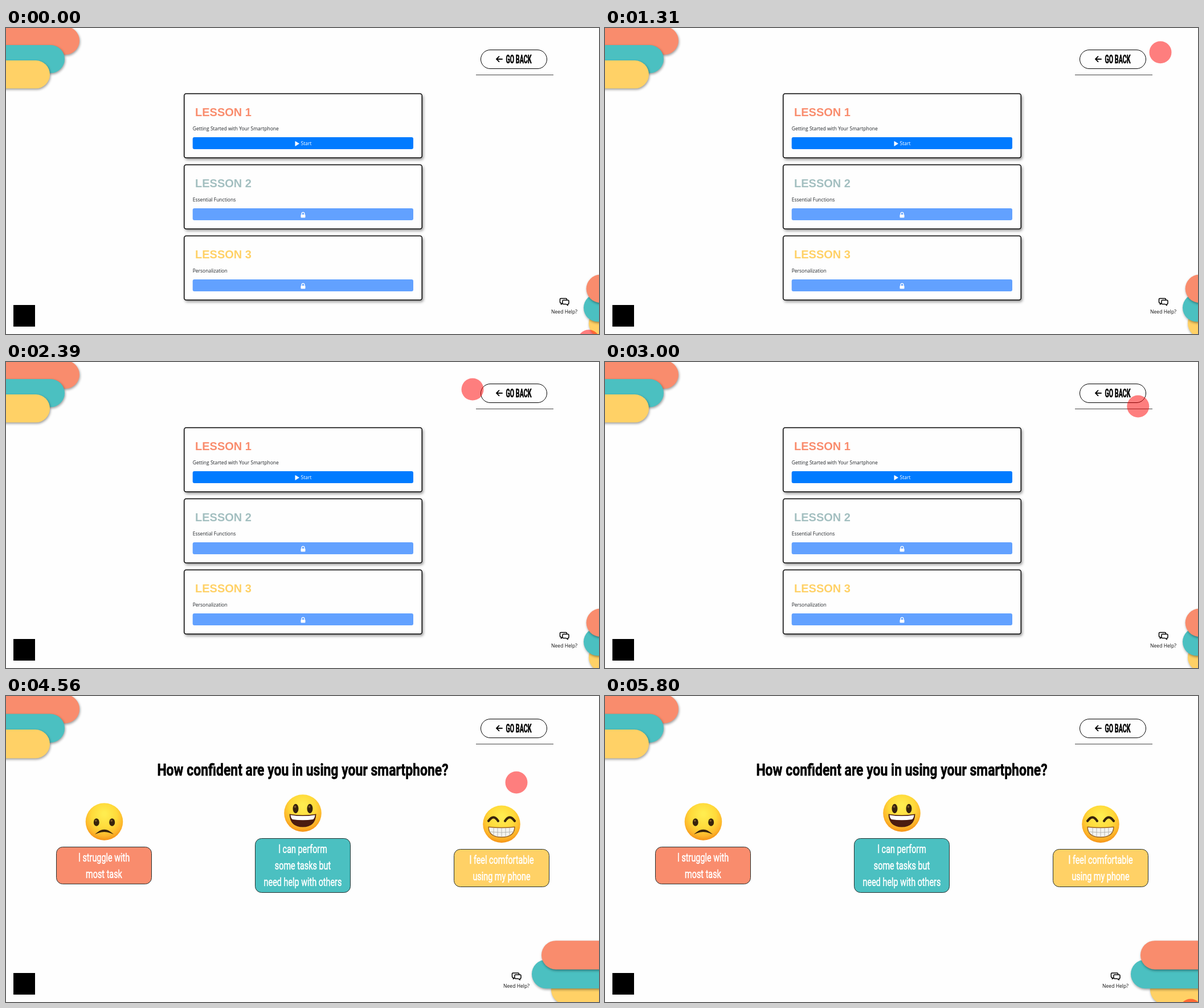
An HTML page with a canvas that plays this animation: 1041 px wide and 538 px high, repeating every 6.07 s.

```html
<!DOCTYPE html>
<html lang="en">
<head>
<meta charset="utf-8">
<title>Lessons</title>
<style>
html, body { margin: 0; width: 100%; height: 100%; overflow: hidden; background: #fefefe; }
canvas { display: block; width: 100vw; height: 100vh; }
</style>
</head>
<body>
<canvas id="stage" width="1041" height="538"></canvas>
<script>
const ctx = document.getElementById('stage').getContext('2d');
const LOOP = 6070, SWITCH = 3760;
const CORAL = '#f98c6d', TEAL = '#4bc0c1', YELLOW = '#ffd166', PAPER = '#fefefe';
const BODY = '"Open Sans", "Noto Sans", sans-serif';
const HEAD = '"Liberation Sans", Arial, sans-serif';
const DISPLAY = 'Roboto, sans-serif';

// Pointer path: time, x, y
const path = [
  [0, 1023, 550], [70, 1023, 550], [350, 968, 350], [640, 905, 166], [910, 916, 112], [1100, 916, 112],
  [1310, 975, 43], [1660, 930, 16], [2000, 852, 20], [2390, 819, 48],
  [2660, 850, 86], [2930, 925, 84], [3130, 938, 64], [3350, 886, 54],
  [4230, 886, 54], [4560, 896, 152], [4860, 896, 152],
  [5460, 985, 410], [5800, 1028, 552], [LOOP, 1028, 552]
];

const clamp = v => Math.max(0, Math.min(1, v));
const fade = (t, start, time) => clamp((t - start) / time);

// Slope at a key; zero where the pointer rests
function slope(i, axis) {
  const a = path[i - 1], b = path[i], c = path[i + 1];
  if (!a || !c) return 0;
  const rests = (p, q) => p[1] === q[1] && p[2] === q[2];
  return rests(a, b) || rests(b, c) ? 0 : (c[axis] - a[axis]) / (c[0] - a[0]);
}

function pointerAt(t) {
  let i = 0;
  while (i < path.length - 2 && t >= path[i + 1][0]) i++;
  const a = path[i], b = path[i + 1], d = b[0] - a[0], u = (t - a[0]) / d;
  const u2 = u * u, u3 = u2 * u;
  return [1, 2].map(k =>
    (2 * u3 - 3 * u2 + 1) * a[k] + (u3 - 2 * u2 + u) * d * slope(i, k) +
    (3 * u2 - 2 * u3) * b[k] + (u3 - u2) * d * slope(i + 1, k));
}

function box(x, y, w, h, r, fill, stroke, line = 1) {
  ctx.beginPath();
  ctx.roundRect(x, y, w, h, r);
  if (fill) { ctx.fillStyle = fill; ctx.fill(); }
  if (stroke) { ctx.strokeStyle = stroke; ctx.lineWidth = line; ctx.stroke(); }
}

function shadowed(dx, dy, blur, alpha, draw) {
  ctx.save();
  ctx.shadowColor = `rgba(0,0,0,${alpha})`;
  ctx.shadowOffsetX = dx;
  ctx.shadowOffsetY = dy;
  ctx.shadowBlur = blur;
  draw();
  ctx.restore();
}

function oval(x, y, rx, ry, fill) {
  ctx.beginPath();
  ctx.ellipse(x, y, rx, ry, 0, 0, 7);
  ctx.fillStyle = fill;
  ctx.fill();
}

function shape(d, fill, stroke, line) {
  const p = new Path2D(d);
  if (fill) { ctx.fillStyle = fill; ctx.fill(p); }
  if (stroke) { ctx.strokeStyle = stroke; ctx.lineWidth = line; ctx.stroke(p); }
}

function at(x, y, draw) {
  ctx.save();
  ctx.translate(x, y);
  draw();
  ctx.restore();
}

function text(str, x, y, font, fill, align = 'left', narrow = 1) {
  at(x, y, () => {
    ctx.scale(narrow, 1);
    ctx.font = font;
    ctx.textAlign = align;
    ctx.fillStyle = ctx.strokeStyle = fill;
    ctx.fillText(str, 0, 0);
    // Narrowing thins the stems, so thicken them again
    if (narrow < 1) {
      ctx.lineWidth = .6;
      ctx.lineJoin = 'round';
      ctx.strokeText(str, 0, 0);
    }
  });
}

function pill(x, y, w, h, fill) {
  shadowed(1, 2, 4, .4, () => box(x, y, w, h, h / 2, fill));
}

function leftPills(y1, y2, y3, h) {
  pill(-60, y1, 189, h, CORAL);
  pill(-60, y2, 163, h, TEAL);
  pill(-60, y3, 137, h, YELLOW);
}

function rightPills(coral, teal, yellow, y, h) {
  pill(yellow, y + 61, 200, h, YELLOW);
  pill(teal, y + 33.5, 200, h, TEAL);
  pill(coral, y, 200, h, CORAL);
}

function mix(a, b, k) {
  return `rgb(${a.map((v, i) => Math.round(v + (b[i] - v) * k))})`;
}

function backButton(y, hover) {
  const fill = mix([254, 254, 254], [38, 104, 208], hover);
  const edge = mix([0, 0, 0], [36, 84, 165], hover);
  box(833.5, y + .5, 116, 33, 16.5, fill, edge);
  at(866, y + 16.7, () => {
    ctx.lineCap = 'round';
    ctx.lineJoin = 'round';
    shape('M5 0H-5M-.5 -4.5L-5 0L-.5 4.5', null, '#000', 1.9);
  });
  text('GO BACK', 900, y + 23.6, `bold 21px ${DISPLAY}`, mix([0, 0, 0], [254, 254, 254], hover), 'center', .51);
  ctx.fillStyle = '#444';
  ctx.fillRect(825, y + 44, 136, 1);
}

function help(x, y) {
  at(x, y, () => {
    ctx.lineJoin = 'round';
    shape('M-6 -5.5H3Q4.5 -5.5 4.5 -4V1Q4.5 2.5 3 2.5H-2.5L-5.5 5V2.5H-6Q-7.5 2.5 -7.5 1V-4Q-7.5 -5.5 -6 -5.5Z', PAPER, '#000', 1.5);
    shape('M-1.5 -2.5H6.5Q8 -2.5 8 -1V3Q8 4.5 6.5 4.5H6.2V6.7L3.2 4.5H-1.5Q-3 4.5 -3 3V-1Q-3 -2.5 -1.5 -2.5Z', PAPER, '#000', 1.5);
  });
  text('Need Help?', x, y + 20.7, `8.6px ${BODY}`, '#111', 'center');
}

function lock(x, y) {
  box(x - 4, y - .5, 8, 5.5, 1, '#fff');
  shape(`M${x - 2.4} ${y}V${y - 2}a2.4 2.4 0 0 1 4.8 0V${y}`, null, '#fff', 1.4);
}

function lesson(y, name, about, color, open) {
  shadowed(2, 3, 5, .45, () => box(312.5, y, 418, 113.5, 4, PAPER));
  box(312.75, y + .5, 417.5, 112.8, 3.5, PAPER, '#000', 1.5);
  text(name, 332, y + 39.5, `bold 20px ${HEAD}`, color);
  text(about, 327.7, y + 64.6, `8.5px ${BODY}`, '#212529');
  box(327.7, y + 77, 387.3, 21, 3, open ? '#007bff' : '#62a1ff');
  if (open) {
    shape(`M507.5 ${y + 84.6}Q507.5 ${y + 83.6} 508.4 ${y + 84.2}L515 ${y + 88.3}L508.4 ${y + 92.6}Q507.5 ${y + 93} 507.5 ${y + 92.2}Z`, '#fff');
    text('Start', 517.6, y + 91, `8.5px ${BODY}`, '#fff');
  } else {
    lock(521.5, y + 88.5);
  }
}

function lessonsPage(hover) {
  leftPills(-2.5, 30, 57, 49.3);
  rightPills(1018.7, 1014, 1023, 433.7, 49.3);
  backButton(38, hover);
  lesson(115, 'LESSON 1', 'Getting Started with Your Smartphone', CORAL, true);
  lesson(240, 'LESSON 2', 'Essential Functions', '#a3bfc0', false);
  lesson(365, 'LESSON 3', 'Personalization', YELLOW, false);
  help(980, 481);
}

function face(x, y, draw) {
  at(x, y, () => {
    const g = ctx.createRadialGradient(0, -14, 3, 0, -8, 42);
    g.addColorStop(0, '#ffec4f');
    g.addColorStop(.5, '#ffda3a');
    g.addColorStop(.8, '#fdb62b');
    g.addColorStop(1, '#f38c12');
    oval(0, 0, 32.8, 32.8, g);
    ctx.lineCap = 'round';
    draw();
  });
}

function eyes(y, gap, rx, ry) {
  for (const x of [-gap, gap]) {
    oval(x, y, rx, ry, '#37230c');
    oval(x - 1, y - ry * .4, rx * .35, ry * .25, '#7d5b2c');
  }
}

function sad() {
  eyes(1, 13.7, 5, 6.8);
  shape('M-11 19Q0 10.5 11 19Q0 15 -11 19Z', '#37230c', '#37230c', 2);
}

function happy() {
  eyes(-8, 12.5, 5, 8.2);
  shape('M-23.5 1.5Q0 5.5 23.5 1.5Q22.5 24.5 0 24.5Q-22.5 24.5 -23.5 1.5Z', '#4b1c10');
  shape('M-21.5 3.2Q0 7 21.5 3.2Q21 9 18 11Q0 13.5 -18 11Q-21 9 -21.5 3.2Z', '#fff');
}

function grin() {
  ctx.lineJoin = 'round';
  shape('M-23 -5.5Q-14 -18.5 -6 -5.5M6 -5.5Q14 -18.5 23 -5.5', null, '#37230c', 4.2);
  shape('M-23 5Q0 7.5 23 5Q22.5 23 0 23Q-22.5 23 -23 5Z', '#f4f4f0', '#9c6422', 1.5);
  shape('M-21 13.5Q0 16 21 13.5M-14 7V20M-7 7V22M0 7V22M7 7V22M14 7V20', null, '#a9a9a4', .8);
}

function answer(x, y, h, color, lines) {
  box(x - 83.5, y + .5, 167, h, 11, color, '#25302f');
  lines.forEach((s, i) =>
    text(s, x, y + 25.5 + i * 29.3, `21px ${DISPLAY}`, '#fff', 'center', .685));
}

function surveyPage(hover) {
  leftPills(-2.5, 31.5, 59, 50.5);
  rightPills(940, 923, 957, 430.2, 50.5);
  backButton(40, hover);
  text('How confident are you in using your smartphone?', 521, 140,
    `bold 30px ${DISPLAY}`, '#000', 'center', .765);
  face(172.5, 221, sad);
  face(521, 206, happy);
  face(870, 225.3, grin);
  answer(172, 265, 65, CORAL, ['I struggle with', 'most task']);
  answer(521, 250, 95, TEAL, ['I can perform', 'some tasks but', 'need help with others']);
  answer(870, 269, 66, YELLOW, ['I feel comfortable', 'using my phone']);
  help(896, 492.5);
}

function frame(now) {
  const t = now % LOOP;
  const hover = fade(t, 3140, 180) * (1 - fade(t, 4330, 120));
  ctx.fillStyle = PAPER;
  ctx.fillRect(0, 0, 1041, 538);
  (t < SWITCH ? lessonsPage : surveyPage)(hover);
  box(13, 487, 38, 38, 0, '#000');
  const [x, y] = pointerAt(t);
  oval(x, y, 19.5, 19.5, 'rgba(255,0,0,.5)');
}

const start = performance.now();
function tick() {
  frame(performance.now() - start);
  requestAnimationFrame(tick);
}
tick();
</script>
</body>
</html>
```
